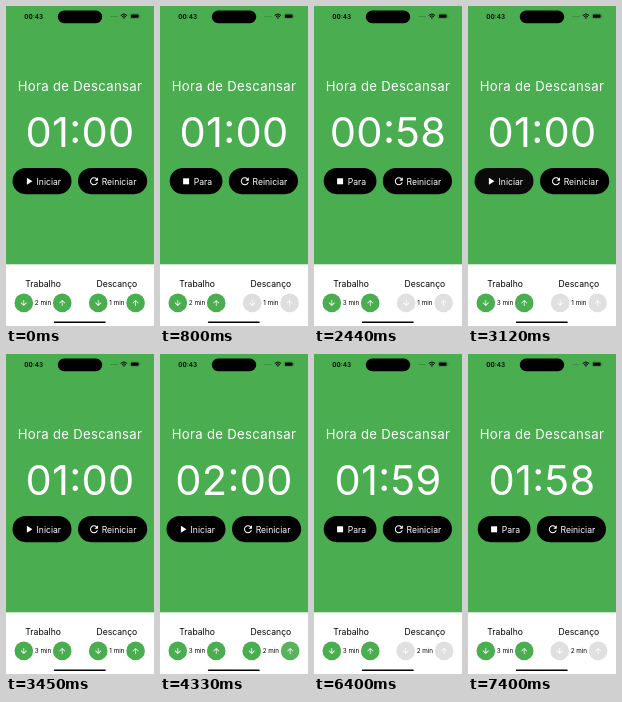
Recreate the animation shown at these times as an HTML page. Size 148x320 px, loop 8 s.

```html
<!DOCTYPE html>
<html lang="pt">
<head>
<meta charset="utf-8">
<title>Hora de Descansar</title>
<style>
  html, body { margin: 0; width: 100%; height: 100%; overflow: hidden; background: #fff; }
  svg { display: block; width: 100vw; height: 100vh; }
  text { font-family: Inter, Roboto, "Liberation Sans", sans-serif; }
  .light { fill: #fff; }
  .label { font-size: 8.6px; }
  .unit { font-size: 6.3px; }
  .mid { text-anchor: middle; }
  .clock { font-size: 41.6px; letter-spacing: .3px; font-feature-settings: "calt" 0; }
</style>
</head>
<body>
<svg viewBox="0 0 148 320">
  <defs>
    <path id="refresh" d="M17.65 6.35C16.2 4.9 14.21 4 12 4c-4.42 0-7.99 3.58-7.99 8s3.57 8 7.99 8c3.73 0 6.84-2.55 7.73-6h-2.08c-.82 2.33-3.04 4-5.65 4-3.31 0-6-2.69-6-6s2.69-6 6-6c1.66 0 3.14.69 4.22 1.78L13 11h7V4l-2.35 2.35z"/>
    <path id="arrow" d="M20 12l-1.41-1.41L13 16.17V4h-2v12.17l-5.58-5.59L4 12l8 8 8-8z" transform="scale(.377) translate(-12 -12)"/>
  </defs>
  <rect width="148" height="258.3" fill="#4aae50"/>

  <!-- status bar -->
  <text class="mid" x="27.7" y="12.5" font-size="6.4" font-weight="600">00:43</text>
  <rect x="51.8" y="4.6" width="44.4" height="12.6" rx="6.3"/>
  <g fill="#2f7937">
    <circle cx="105.2" cy="10.6" r=".6"/><circle cx="107.1" cy="10.6" r=".6"/>
    <circle cx="109" cy="10.6" r=".6"/><circle cx="110.9" cy="10.6" r=".6"/>
  </g>
  <g fill="none" stroke="#000" stroke-width="1">
    <path d="M114.7 9.4q3.2-2.9 6.4 0M115.9 10.7q2-1.8 4 0"/>
    <path d="M117.1 11.7h1.6l-.8.8z" stroke-width=".5" fill="#000"/>
  </g>
  <rect x="124.2" y="7.8" width="9.1" height="4.7" rx="1.5" fill="none" stroke="#2f7937" stroke-width=".45"/>
  <rect x="124.9" y="8.5" width="7.7" height="3.3" rx=".9"/>
  <rect x="133.8" y="9.4" width=".6" height="1.6" rx=".3" fill="#2f7937"/>

  <text class="light mid" x="74" y="84.6" font-size="13.15" letter-spacing=".32">Hora de Descansar</text>
  <text class="clock light mid" x="74" y="141.1"><tspan id="minutes"></tspan><tspan dy="-3.7">:</tspan><tspan id="seconds" dy="3.7"></tspan></text>

  <rect id="mainPill" y="162" height="26.2" rx="13.1"/>
  <path id="mainIcon" class="light"/>
  <text id="mainText" class="light label" y="178.6"></text>
  <g id="reset">
    <rect x="72" y="162" width="69.2" height="26.2" rx="13.1"/>
    <use href="#refresh" class="light" transform="translate(82 169.3) scale(.5)"/>
    <text class="light label" x="95.7" y="178.6">Reiniciar</text>
  </g>

  <text class="label mid" x="37.1" y="281.2">Trabalho</text>
  <text class="label mid" x="110.9" y="281.2">Descanço</text>
  <g id="steppers"></g>
  <rect x="47.8" y="315.5" width="52" height="1.6" rx=".8"/>
</svg>
<script>
const LOOP = 8000;
const GREEN = [74, 174, 80], GREY = [224, 224, 224];
const TIMER = [[0, "01:00"], [1410, "00:59"], [2440, "00:58"], [3120, "01:00"],
               [4130, "02:00"], [6400, "01:59"], [7400, "01:58"]];
const TOGGLES = [500, 3120, 5420];
const WORK_TAP = 1810, REST_TAP = 4130;

const $ = id => document.getElementById(id);
const clamp = v => Math.max(0, Math.min(1, v));
const set = (el, attrs) => Object.entries(attrs).forEach(([k, v]) => el.setAttribute(k, v));
const mix = (a, b, p) => `rgb(${a.map((v, i) => Math.round(v + (b[i] - v) * p))})`;

function add(parent, tag, attrs) {
  const el = document.createElementNS("http://www.w3.org/2000/svg", tag);
  set(el, attrs);
  parent.appendChild(el);
  return el;
}

function makeRound(parent, turn) {
  const group = add(parent, "g", {});
  const disc = add(group, "circle", { r: 9.3 });
  const ripple = add(group, "circle", { fill: "#fff" });
  add(group, "use", { href: "#arrow", class: "light", transform: `rotate(${turn})` });
  return { group, disc, ripple };
}

function makeStepper(cx) {
  const parent = $("steppers");
  return {
    cx, down: makeRound(parent, 0), up: makeRound(parent, 180),
    text: add(parent, "text", { class: "unit mid", x: cx, y: 299.2 })
  };
}

function drawStepper(s, minutes, color, sinceTap, duration) {
  const gap = minutes === 1 ? 18.7 : 19.2;
  const p = clamp(sinceTap / duration);
  [[s.down, -gap], [s.up, gap]].forEach(([b, dx]) => {
    set(b.group, { transform: `translate(${s.cx + dx} 296.9)` });
    set(b.disc, { fill: color });
  });
  set(s.up.ripple, {
    r: 9.3 * clamp(.4 + p * 1.2),
    opacity: sinceTap < 0 ? 0 : .22 * (1 - p)
  });
  s.text.textContent = minutes + " min";
}

const work = makeStepper(37), rest = makeStepper(110.9);

function draw(t) {
  const past = TOGGLES.filter(at => t >= at);
  const running = past.length % 2 === 1;
  const fade = clamp((t - (past.pop() ?? -LOOP)) / 310);
  const glow = Math.round(10 * (1 - fade));

  const [minutes, seconds] = TIMER.filter(([at]) => t >= at).pop()[1].split(":");
  $("minutes").textContent = minutes;
  $("seconds").textContent = seconds;
  set($("mainPill"), {
    x: running ? 9.7 : 6.5, width: running ? 52.8 : 59,
    fill: `rgb(${glow},${glow},${glow})`
  });
  set($("mainIcon"), {
    d: running ? "M6 6h12v12H6z" : "M8 5v14l11-7z",
    transform: `translate(${running ? 20.1 : 16.9} 169.3) scale(.5)`
  });
  set($("mainText"), { x: running ? 33.7 : 30.5 });
  $("mainText").textContent = running ? "Para" : "Iniciar";
  set($("reset"), { transform: `translate(${running ? -3.2 : 0})` });

  drawStepper(work, t < WORK_TAP ? 2 : 3, mix(GREEN, GREEN, 0), t - WORK_TAP, 450);
  drawStepper(rest, t < REST_TAP ? 1 : 2, mix(GREEN, GREY, running ? fade : 1 - fade), t - REST_TAP, 300);
}

const start = performance.now();
function tick() {
  draw((performance.now() - start) % LOOP);
  requestAnimationFrame(tick);
}
tick();
</script>
</body>
</html>
```
